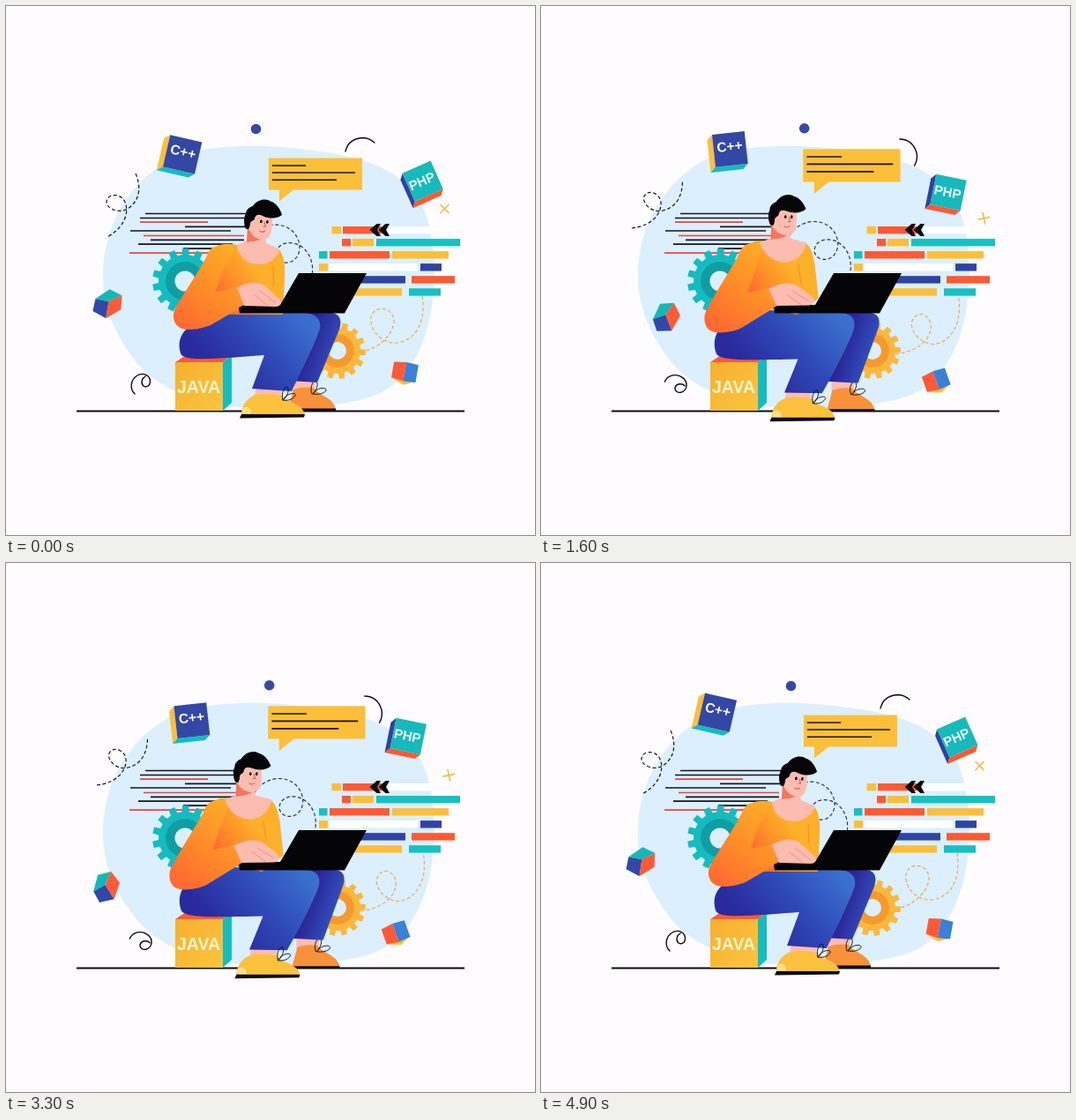
These frames come from a looping animation (600x600 px, 5000 ms). An HTML page:

```html
<!DOCTYPE html>
<html lang="en">
<head>
<meta charset="utf-8">
<title>Programmer at work</title>
<style>
  html, body { margin: 0; width: 100%; height: 100%; overflow: hidden; background: #fefcff; }
  svg { display: block; width: 100vw; height: 100vh; }
  text { font-family: "Liberation Sans", Arial, sans-serif; font-weight: 700; text-anchor: middle; }
  .line, .lace { fill: none; stroke: #0b0b14; stroke-width: 1.4; stroke-linecap: round; }
  .lace { stroke-width: .9; }
  .dash { fill: none; stroke-width: 1.2; stroke-dasharray: 4 2.6; }
</style>
</head>
<body>
<svg viewBox="0 0 600 600">
  <defs>
    <linearGradient id="armFill" gradientUnits="userSpaceOnUse" x1="205" y1="368" x2="268" y2="284">
      <stop offset="0" stop-color="#ff6a32"/><stop offset=".45" stop-color="#ff8a29"/><stop offset="1" stop-color="#fdac28"/>
    </linearGradient>
    <linearGradient id="shirtFill" gradientUnits="userSpaceOnUse" x1="236" y1="328" x2="282" y2="296">
      <stop offset="0" stop-color="#ff6430"/><stop offset=".5" stop-color="#ff9029"/><stop offset="1" stop-color="#fdb02a"/>
    </linearGradient>
    <linearGradient id="nearFill" gradientUnits="userSpaceOnUse" x1="252" y1="426" x2="336" y2="350">
      <stop offset="0" stop-color="#2a2a9c"/><stop offset=".5" stop-color="#2f4ab8"/><stop offset="1" stop-color="#3a70cd"/>
    </linearGradient>
    <linearGradient id="farFill" gradientUnits="userSpaceOnUse" x1="342" y1="378" x2="378" y2="390">
      <stop offset="0" stop-color="#292191"/><stop offset="1" stop-color="#3251c0"/>
    </linearGradient>
    <linearGradient id="boxFill" x1="0" y1="0" x2="1" y2="1">
      <stop offset="0" stop-color="#f5b02f"/><stop offset="1" stop-color="#fcc43f"/>
    </linearGradient>
  </defs>

  <path fill="#dbeffe" d="M110 305C110 255 135 205 180 178C215 156 290 156 340 163C395 169 440 180 465 215C482 238 488 280 485 320C482 375 460 425 420 441C380 456 320 457 270 455C220 455 165 430 145 400C122 370 110 340 110 305Z"/>
  <g id="notes" stroke-width="1.7"></g>
  <path id="leftCurl" class="dash" stroke="#15151f" d="M147 190C153 204 153 220 138 230C128 236 114 230 114 222C115 213 127 213 132 218C140 226 140 248 115 262"/>
  <path id="headCurl" class="dash" stroke="#27346f" d="M278 266C288 246 306 241 320 246C335 252 341 270 333 281C327 290 313 289 310 279C309 269 318 263 329 265C343 267 355 284 350 304"/>
  <path id="rightCurl" class="dash" stroke="#f0a757"/>
  <path id="topArc" class="line" d="M385 165Q388 151 404 149.5Q412 149.5 418 155"/>
  <path id="smallCurl" class="line" d="M146 440C140 434 141 424 149 419C156 415 163 419 163.5 425C164 431 159 433 156 431C152.5 428 154 422 158 420"/>
  <path id="cross" fill="none" stroke="#f1bd4a" stroke-width="1.7" d="M492.5 225L502.5 235M502.5 225L492.5 235"/>
  <circle id="dot" r="5.8" fill="#3748a5"/>

  <g id="bubble">
    <path fill="#fcbf3a" d="M0 0H106V36H28L12 49V36H0Z"/>
    <path stroke="#15151f" stroke-width="1.6" d="M4 8.5H42M4 16.5H98M4 24.7H77"/>
  </g>

  <path id="tealGear" fill="#14bcbf"/>
  <circle cx="203" cy="312" r="22" fill="#109ea4"/>
  <circle cx="203" cy="312" r="11.5" fill="#dbeffe"/>
  <path id="goldGear" fill="#fcb73c"/>
  <circle cx="376" cy="391" r="19" fill="#f59a2e"/>
  <circle cx="376" cy="391" r="10" fill="#dbeffe"/>

  <g id="bars"></g>
  <path fill="#0b0b0f" d="M412.500 254L420.500 247H425L421 254L425 261H420.500ZM422.500 254L430.500 247H435L431 254L435 261H430.500Z"/>

  <g id="cpp">
    <path fill="#fcbf3a" d="M-18.500 -18.500L-24.500 -13V24L-18.500 18.500Z"/>
    <path fill="#14bcbf" d="M-18.500 18.500L-24.500 24H12.500L18.500 18.500Z"/>
    <path fill="#3347a4" d="M-18.500 -18.500H18.500V18.500H-18.500Z"/>
    <text y="2" font-size="15.500" fill="#fff">C++</text>
  </g>
  <g id="php">
    <path fill="#3041a0" d="M-17.500 -17.500L-22.500 -11.500V23.500L-17.500 17.500Z"/>
    <path fill="#ff5a33" d="M-17.500 17.500L-22.500 23.500H12.500L17.500 17.500Z"/>
    <path fill="#17b9bc" d="M-17.500 -17.500H17.500V17.500H-17.500Z"/>
    <text x="-1" y="5" font-size="15" fill="#e8fbfa">PHP</text>
  </g>
  <g id="leftCube">
    <path fill="#15b7b5" d="M-14 -6L2 -17L16 -10L1 -3Z"/>
    <path fill="#3148a8" d="M-14 -6L1 -3L-2 16L-17 8Z"/>
    <path fill="#ff5a38" d="M1 -3L16 -10L15 6L-2 16Z"/>
  </g>
  <g id="rightCube">
    <path fill="#fcbf3a" d="M-14 8L0 9L14 8L1 14Z"/>
    <path fill="#ff5a38" d="M-14 -10L0 -12V10L-14 8Z"/>
    <path fill="#3a80d8" d="M0 -12L14 -11V9L0 10Z"/>
  </g>

  <path stroke="#0b0b0f" stroke-width="1.8" d="M80 459.500H520"/>
  <path fill="#ff5a33" d="M192 404L204 396H256L246 404Z"/>
  <path fill="#14bcbf" d="M246 404L256 396V450L246 459Z"/>
  <path fill="url(#boxFill)" d="M192 404H246V459H192Z"/>
  <text x="218.500" y="439" font-size="19.500" fill="#fff6cf">JAVA</text>

  <g id="farShoe">
    <path fill="#fdbcb0" d="M325 420H351L350 438H325Z"/>
    <path fill="#f8923a" d="M320 457L326 435C334 432 342 432 349 433C354 442 371 443 374 457Z"/>
    <path fill="#0b0b0f" d="M320 456.500H374V459H320Z"/>
    <path class="lace" d="M347 440C343 429 352 421 353 428C354 432 350 438 348 440C353 432 364 432 363 436C361 440 353 441 348 440"/>
  </g>
  <path id="farLeg" fill="url(#farFill)"/>
  <g id="nearShoe">
    <path fill="#fdbcb0" d="M284 430H313L312 444H282Z"/>
    <path fill="#fcc13d" d="M267 464C267 451 277 442 284 441C293 439 303 440 313 442C318 451 336 449 339 464Z"/>
    <path fill="#ffe08a" d="M268 462C267 457 270 454 274 455C278 457 279 460 277 463Z"/>
    <path fill="#0b0b0f" d="M267 463H339L338 466.500L265 467.500Z"/>
  </g>
  <path id="nearLeg" fill="url(#nearFill)"/>
  <path id="nearLace" class="lace" d="M314 447C311 435 319 429 320 434C321 439 317 445 314 447C319 438 330 438 328 442C325 447 318 448 314 447"/>
  <path id="shirt" fill="url(#shirtFill)"/>
  <path id="crease" fill="none" stroke="#f58a2a"/>
  <path id="arm" fill="url(#armFill)"/>
  <path id="chest" fill="#fdbcb0"/>
  <path id="neck" fill="#fdbcb0"/>
  <path id="shade" fill="#f5765c"/>
  <g id="head">
    <path fill="#fdbcb0" d="M270 230H296C296.500 240 298 253 294 258C289 263 280 261 275 256L270 250Z"/>
    <path fill="#06060a" d="M267 250C264 244 264 237 266 233C266 228 270 225 273 224C278 216 287 213.500 293 217C299 218 304 224 307 231C303 236 293 237 285 234C280 232 277 234 276.500 237C276 241 273 240 272 243C272 247 271 250 270 251Z"/>
    <ellipse cx="284" cy="240.500" rx="1.300" ry="1.900"/>
    <ellipse cx="291" cy="240.500" rx="1.300" ry="1.900"/>
    <path fill="none" stroke="#d8584c" stroke-width="1" stroke-linecap="round" d="M288 241L289.500 246H287M283 251.500Q286 253.500 289 251"/>
  </g>
  <path fill="#050507" d="M332 303H409L384 348.500H265L264 342L270 339H311Z"/>
  <path id="hand" fill="#fdbcb0"/>
  <path id="fingers" fill="none" stroke="#ee8d80" stroke-width=".9"/>
</svg>

<script>
const LOOP = 5000, STEP = 100;
const $ = id => document.getElementById(id);
const place = (id, value) => $(id).setAttribute('transform', value);

// Each row: y, x start, x end, red or not
const notes = [
  [235.5, 158, 285], [240.5, 152, 280], [245.2, 152, 229, 1], [250.3, 203, 275], [255, 141, 255],
  [260.5, 156, 270, 1], [265.4, 164, 270], [270.2, 150, 257], [275.2, 201, 240], [280.2, 140, 243, 1]
];
$('notes').innerHTML = notes.map(([y, a, b, red]) =>
  `<path stroke="${red ? '#e8453c' : '#15151f'}" d="M${a} ${y}H${b}"/>`).join('');

const gold = '#fcbf3a', red = '#ff5a33', teal = '#17c0c3', blue = '#2f43a3', white = '#fff';
const bars = [
  [[369.5, 380, gold], [382, 426, red], [434, 486, white]],
  [[381, 391, red], [393, 417, gold], [420, 515, teal]],
  [[355, 364.5, teal], [367, 435, red], [438, 502, gold]],
  [[355, 365, gold], [367, 467, white], [470, 494, blue]],
  [[380, 453, blue], [460, 509, red]],
  [[380, 449, gold], [457, 493, teal]]
];
$('bars').innerHTML = bars.map((row, i) => row.map(([a, b, fill]) =>
  `<rect x="${a}" y="${250 + i * 14.05}" width="${b - a}" height="8.4" fill="${fill}"/>`).join('')).join('');

function gear(cx, cy, inner, outer, teeth, turn) {
  const points = [];
  for (let i = 0; i < teeth; i++) {
    for (const [part, r] of [[-.3, inner], [-.22, outer], [.22, outer], [.3, inner]]) {
      const a = (i + part) * 2 * Math.PI / teeth + turn;
      points.push((cx + r * Math.cos(a)).toFixed(2) + ' ' + (cy + r * Math.sin(a)).toFixed(2));
    }
  }
  return 'M' + points.join('L') + 'Z';
}
$('tealGear').setAttribute('d', gear(203, 312, 30, 37, 14, -1.55));

// Paths at the two ends of the sway
const morphs = {
  shirt: [
    'M240 272C248 269 256 271 262 271L308 275C315 280 317 292 316 310L314 350L232 350L228 300Z',
    'M238 268C244 264 250 265 254 265L294 265C302 267 306 277 309 290L315 325L311 350L226 350L226 300Z'],
  crease: ['M303 296L304 318', 'M288 292L292 315'],
  arm: [
    'M240 272C248 269 256 270 262 271L245 302L238 324L262 319L270 340L232 362C222 366 203 370 196 364C188 358 189 347 193 341C208 316 222 296 228 283C231 276 234 273 240 272Z',
    'M238 268C244 264 250 265 254 265L241 302L233 326L257 320L266 341L226 366C214 372 196 374 188 368C182 361 183 350 187 344C200 318 216 296 223 281C226 273 230 269 238 268Z'],
  chest: [
    'M262 271C264 285 273 293 287 293C299 293 307 286 311 276L293 268L274 266Z',
    'M243 267C248 279 258 289 272 290C286 290 295 280 298 266L279 262L258 262Z'],
  neck: ['M274 248L273 274L295 274L294 255Z', 'M257 244L256 270L279 268L278 250Z'],
  shade: [
    'M274 251C278 259 284 263 292 263C286 267 279 267 273 268Z',
    'M257 247C261 255 267 259 275 259C269 263 262 263 256 264Z'],
  nearLeg: [
    'M212 362C198 368 194 382 198 394C201 404 240 400 293 396L279 434L324 437C332 420 350 385 356 366C358 354 350 348 336 348L258 345Z',
    'M206 362C196 370 195 384 199 394C203 403 240 402 291 402L275 440L317 440C328 422 348 385 354 368C358 354 352 348 338 348L258 345Z'],
  farLeg: [
    'M330 348L370 348C380 350 381 358 378 367L353 427L322 425L345 372Z',
    'M330 348L376 348C386 350 387 358 383 368L362 428L325 426L345 372Z'],
  hand: [
    'M262 319C275 313 285 312 293 317L311 333C313 337 311 341 306 341L270 340Z',
    'M257 321C271 314 282 313 290 317L307 329C311 333 309 337 304 339L266 340Z'],
  fingers: ['M288 323L306 337M281 327L297 340', 'M284 323L303 334M277 327L294 338'],
  rightCurl: [
    'M472 329C476 352 469 378 444 382C425 384 409 364 415 350C421 339 437 342 440 355C441 369 427 387 404 392',
    'M474 332C479 358 466 381 448 384C435 385 420 371 423 360C428 347 441 350 443 364C444 381 427 394 400 396']
};
const number = /-?[\d.]+/g;
function mix(a, b, k) {
  const ends = b.match(number);
  let i = 0;
  return a.replace(number, v => (+v + (ends[i++] - v) * k).toFixed(2));
}

function draw(time) {
  const angle = 2 * Math.PI * time / LOOP;
  const c = Math.cos(angle), s = Math.sin(angle);
  const k = (1 - c) / 2;
  const lift = s * s;
  const orbit = (id, x, y, turn) => place(id, `translate(${x} ${y}) rotate(${turn})`);

  for (const id in morphs) $(id).setAttribute('d', mix(...morphs[id], k));

  orbit('cpp', 208.5 - 8.5 * c + 2 * s, 170 - c - 9.2 * s, 13 * c);
  orbit('php', 463.5 + 9 * c + 3.3 * s, 202 - 4 * c + 8.5 * s, -24 * c);
  const around = angle + 4.2;
  orbit('leftCube', 123.5 + 18.5 * Math.cos(around), 353.5 + 17 * Math.sin(around), -24 + 24 * c + 6 * s);
  orbit('rightCube', 447.5 + 4.5 * c + 3.5 * s, 420.5 - 5 * c + 3 * s, -10 + 20 * c);

  place('dot', `translate(${283.5 + 20.5 * k} ${139.5 - lift})`);
  place('bubble', `translate(${298 - k} ${172.5 - 14 * k}) scale(${1 + .055 * k})`);
  place('topArc', `rotate(${105 * k} 404.6 171.5)`);
  place('smallCurl', `rotate(${95 * k} 153 429)`);
  place('cross', `rotate(${45 * k} 482 243.5)`);
  place('leftCurl', `rotate(${33 * k} 131 226)`);
  place('headCurl', `translate(${-3.5 + 5 * k} ${4 - 5 * k})`);
  $('goldGear').setAttribute('d', gear(376, 391, 26, 32, 14, .06 - .12 * k));

  place('head', `translate(${5.5 - 16.5 * k} ${3.5 - 4 * k - 2.7 * lift}) rotate(${5 * (1 - lift)} 280 240)`);
  for (const id of ['nearShoe', 'nearLace']) place(id, `translate(${-7.5 * k} ${5 * k})`);
  place('farShoe', `translate(${6 * k} ${k})`);
}

// The picture advances ten times a second
function frame() {
  const now = performance.now() % LOOP;
  draw((Math.floor(now / STEP) + .5) * STEP);
  requestAnimationFrame(frame);
}
frame();
</script>
</body>
</html>
```
